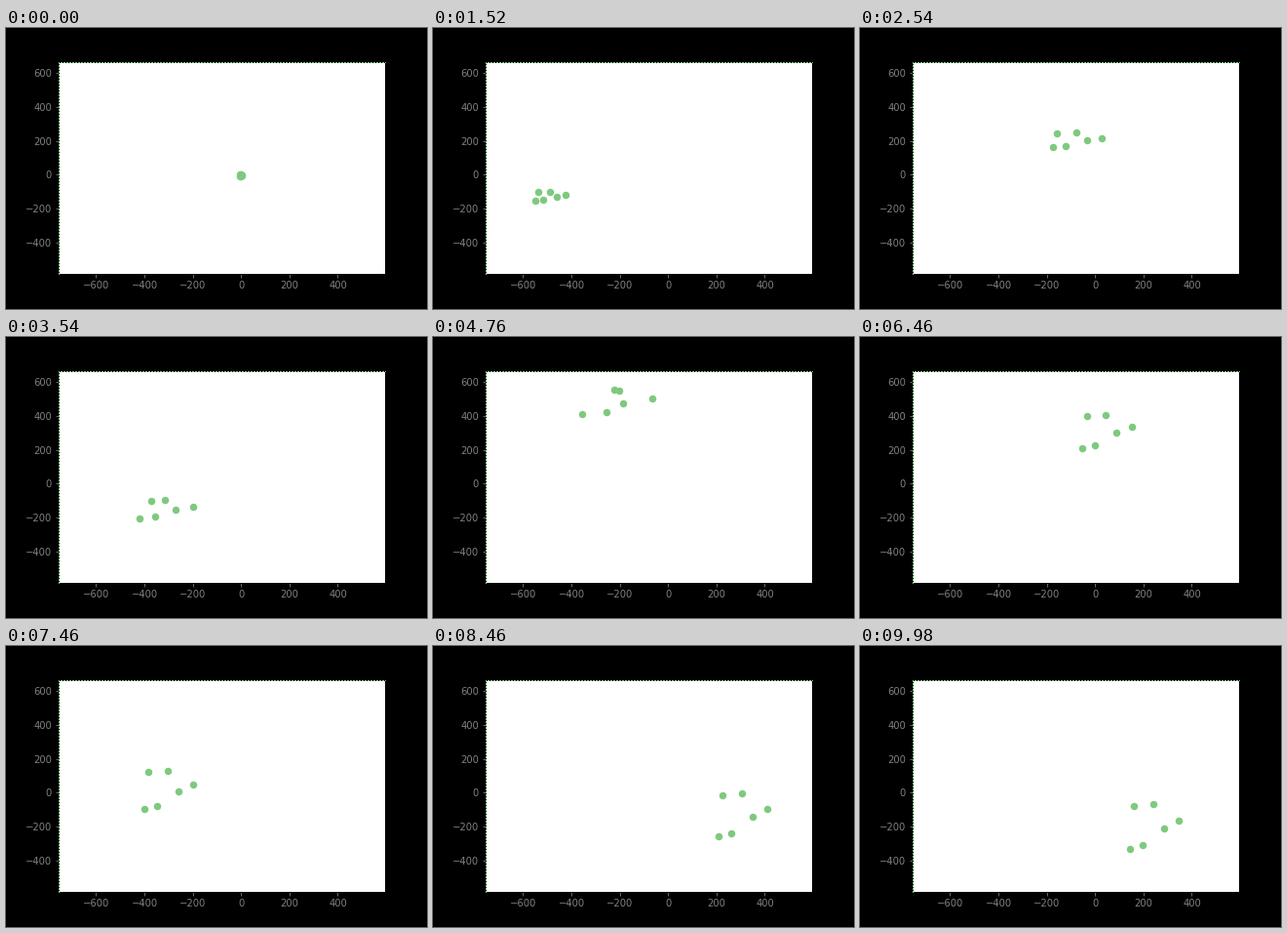
Recreate the animation shown at these times as a matplotlib script. Size 432x288 px, loop 10000 ms.

```python
import numpy as np
import matplotlib.pyplot as plt
from matplotlib.animation import FuncAnimation

WIDTH, HEIGHT, DPI = 432, 288, 72
FRAMES, INTERVAL = 500, 20
GREEN, GREY = "#7fc97f", "#808080"

# Turning points of the swarm's middle: (seconds, stage pixels)
X_TURNS = [(0, 241), (1.04, 86), (2.5, 219), (3.65, 160), (5.4, 200),
           (5.9, 190), (6.5, 250), (7.15, 148), (8.92, 345), (9.98, 298)]
Y_TURNS = [(0, 151), (2.1, 177), (2.6, 112), (3.45, 177), (5.0, 59),
           (5.5, 59), (6.8, 103), (8.1, 188), (9.0, 142), (9.6, 216), (9.98, 184)]

# Each dot's place in the fully spread swarm, and its shift when the swarm stretches
PLACES = np.array([(-21, 24), (-8, 20), (-17, -20), (3, -22), (29, -5), (14, 3)])
STRETCH = np.array([-14, -2, 20, -5, 8, -7])


def swing(t, turns):
    """Ease in and out from one turning point to the next."""
    times, values = np.array(turns, float).T
    k = np.clip(np.searchsorted(times, t, side="right") - 1, 0, len(times) - 2)
    u = (t - times[k]) / (times[k + 1] - times[k])
    return values[k] + (values[k + 1] - values[k]) * (1 - np.cos(np.pi * u)) / 2


def swarm(t):
    """Dot positions in stage pixels: the swarm drifts while it spreads out."""
    wide = min(1, 0.04 + 0.38 * t)
    tall = min(1, 0.03 + t / 9)
    stretch = np.exp(-(t - 4.76) ** 2)
    x = swing(t, X_TURNS) + wide * PLACES[:, 0] + stretch * STRETCH
    y = swing(t, Y_TURNS) + tall * PLACES[:, 1]
    return np.column_stack([x, HEIGHT - y])


fig = plt.figure(figsize=(WIDTH / DPI, HEIGHT / DPI), dpi=DPI, facecolor="black")
ax = fig.add_axes([0.125, 0.125, 0.775, 0.755], facecolor="white")
ax.set_xlim(-755, 595)
ax.set_ylim(-586, 667)
ax.set_xticks(range(-600, 401, 200))
ax.set_yticks(range(-400, 601, 200))
ax.tick_params(colors=GREY, labelsize=10, width=0.8, length=3.5)
ax.spines[:].set(edgecolor="black", linewidth=1)

# Dotted green line over the left and top edges
ax.plot([0, 0, 1], [0, 1, 1], transform=ax.transAxes, color=GREEN, linewidth=1,
        linestyle=(0.5, (1, 1)), dash_capstyle="butt", antialiased=False,
        clip_on=False, zorder=3)

to_data = ax.transData.inverted()
dots = ax.scatter(*to_data.transform(swarm(0)).T, s=36, color=GREEN, linewidths=1.5)


def draw(i):
    dots.set_offsets(to_data.transform(swarm(i * INTERVAL / 1000)))
    return (dots,)


anim = FuncAnimation(fig, draw, frames=FRAMES, interval=INTERVAL,
                     repeat=True, repeat_delay=0, blit=False)
plt.show()
```
